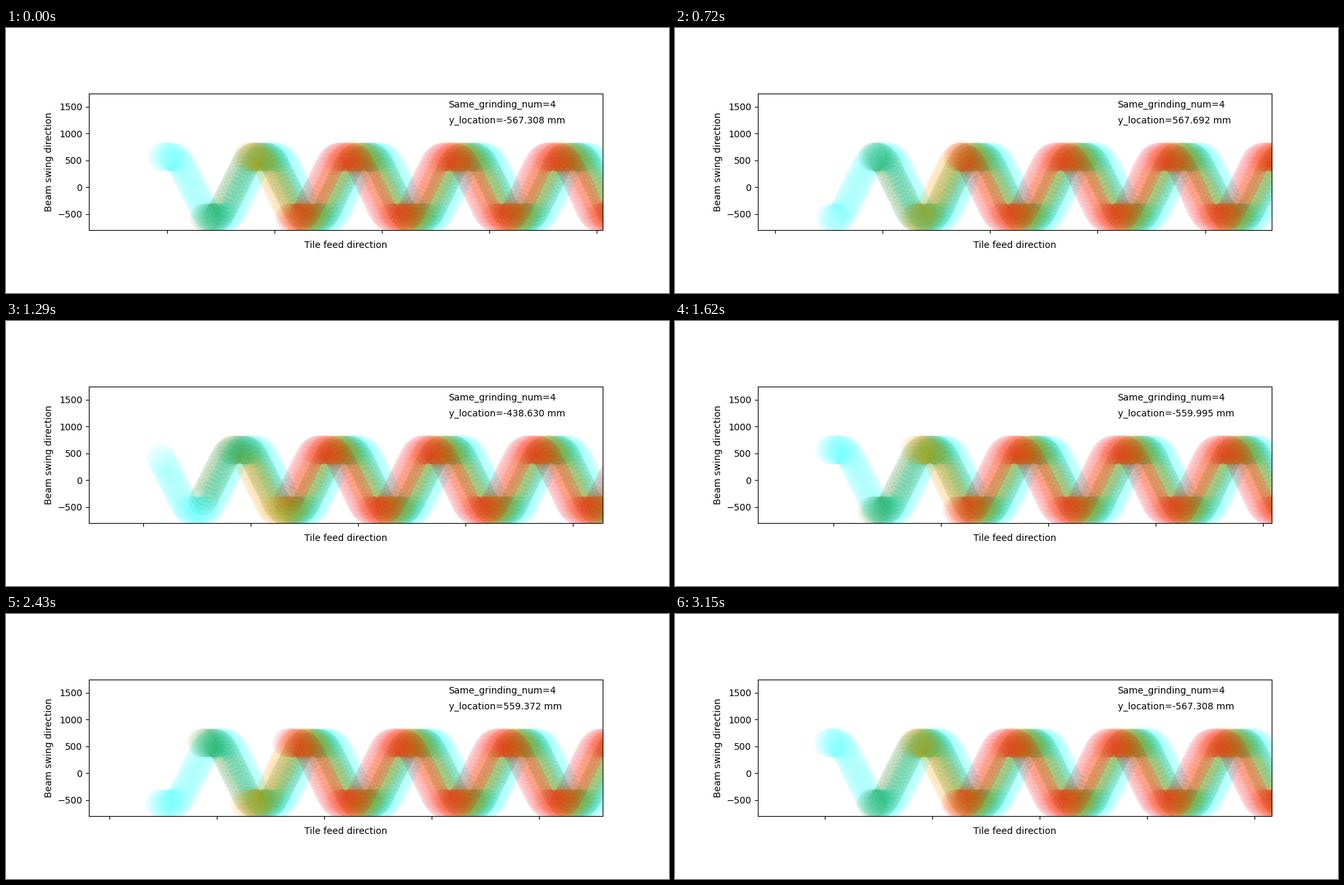
Animation, 1000 px wide and 400 px high, one loop 3180 ms. Source, as a matplotlib script:

```python
import numpy as np
import matplotlib.pyplot as plt
from matplotlib.animation import FuncAnimation
from matplotlib.collections import EllipseCollection
from matplotlib.ticker import MultipleLocator, NullFormatter

FRAMES, INTERVAL = 106, 30
PERIOD = 53                   # frames per full swing
SPEED, ACCEL = 75.0, 14.625   # mm per frame, mm per frame squared
T_ACC, T_CONST = 77 / 15, 10
Y_LOW, Y_HIGH = -567.308, 567.692
FALL_START = 26 + 14 / 15

FEED, PAN = 36.6, 36.1        # mm per frame: tile feed and view scroll
VIEW_LEFT, VIEW_WIDTH = -1460, 9567
HEAD_X, HEAD_GAP = -105, 790
RADIUS, ALPHA = 260, 0.05
HEADS = [("cyan", 27), ("green", 1), ("orange", 27), ("red", 1)]


def stroke(t):
    """Distance covered t frames into one stroke with a trapezoidal speed."""
    t = np.maximum(t, 0)
    ramp = np.minimum(t, T_ACC)
    cruise = np.clip(t - T_ACC, 0, T_CONST)
    brake = np.clip(t - T_ACC - T_CONST, 0, SPEED / ACCEL)
    return (ACCEL / 2 * ramp**2 + SPEED * cruise
            + SPEED * brake - ACCEL / 2 * brake**2)


def swing(n):
    phase = np.mod(n, PERIOD)
    return np.where(phase < FALL_START, Y_LOW + stroke(phase),
                    Y_HIGH - stroke(phase - FALL_START))


fig, ax = plt.subplots(figsize=(10, 4), dpi=100)
ax.set_aspect("equal")
ax.set_ylim(-800, 1750)
ax.xaxis.set_major_locator(MultipleLocator(2000))
ax.xaxis.set_major_formatter(NullFormatter())
ax.yaxis.set_major_locator(MultipleLocator(500))
ax.set_xlabel("Tile feed direction")
ax.set_ylabel("Beam swing direction")
ax.text(0.7, 0.9, "Same_grinding_num=4", transform=ax.transAxes)
label = ax.text(0.7, 0.78, "", transform=ax.transAxes)

trails = []
for color, _ in HEADS:
    trail = EllipseCollection(
        [2 * RADIUS], [2 * RADIUS], [0], units="xy", offsets=[(0, 0)],
        offset_transform=ax.transData, facecolors=color, edgecolors=color,
        linewidths=1, alpha=ALPHA)
    ax.add_collection(trail, autolim=False)
    trails.append(trail)


def update(n):
    left = VIEW_LEFT - PAN * n
    right = left + VIEW_WIDTH
    ax.set_xlim(left, right)
    for k, (_, lag) in enumerate(HEADS):
        x0 = HEAD_X + HEAD_GAP * k - FEED * n
        count = int((right + RADIUS - x0) / FEED) + 1
        age = np.arange(count)[::-1]
        trails[k].set_offsets(
            np.column_stack([x0 + FEED * age, swing(n - lag - age)]))
    label.set_text(f"y_location={float(swing(n)):.3f} mm")
    return [*trails, label]


anim = FuncAnimation(fig, update, frames=FRAMES, interval=INTERVAL,
                     init_func=lambda: update(0), repeat=True, repeat_delay=0)
plt.show()
```
